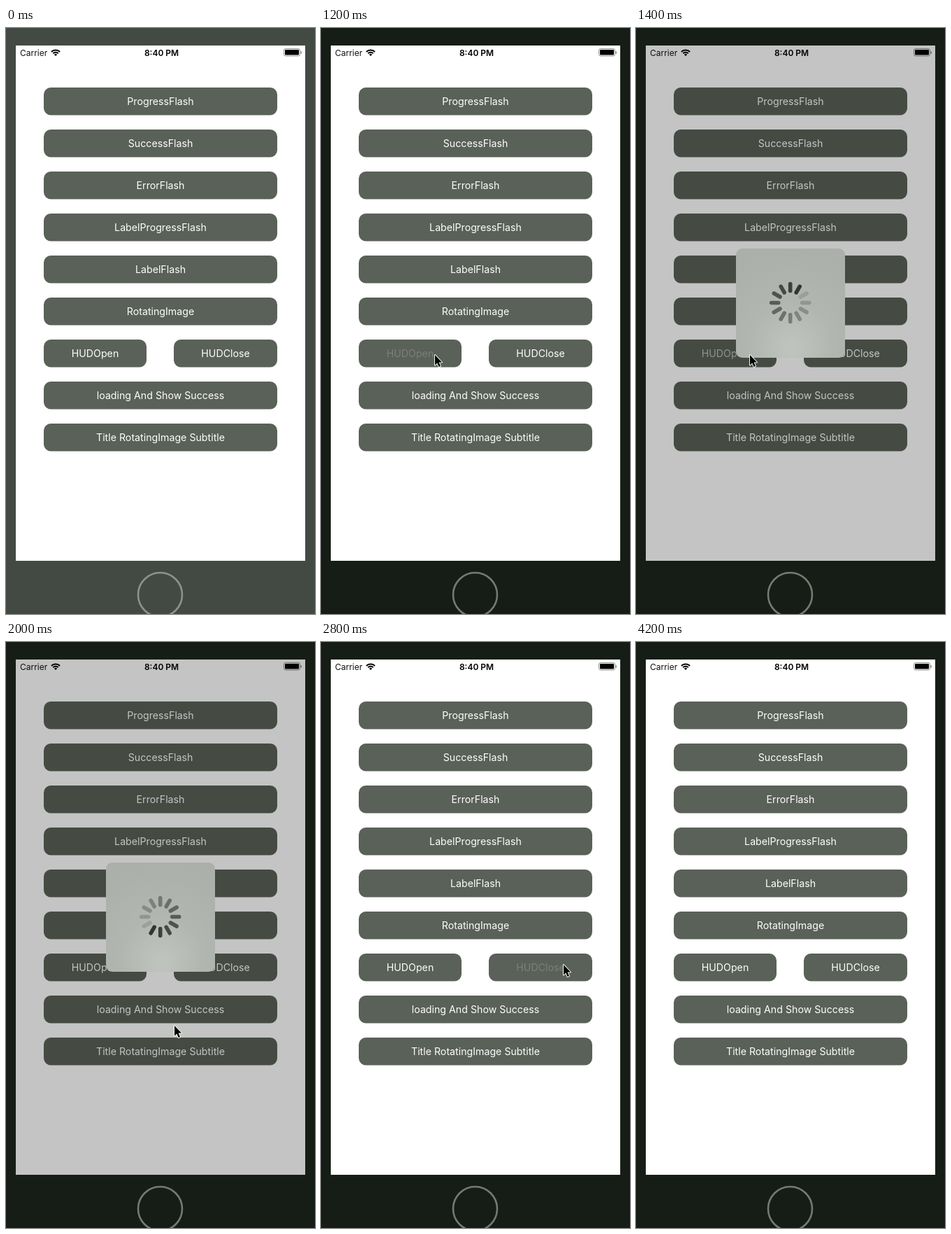
These frames come from a looping animation (442 by 837 pixels, 4300 ms). An HTML page with a canvas:

```html
<!DOCTYPE html>
<html lang="en">
<head>
<meta charset="utf-8">
<title>HUD demo</title>
<style>
  html, body { margin: 0; width: 100%; height: 100%; overflow: hidden; background: #161d16; }
  canvas { display: block; }
</style>
</head>
<body>
<canvas width="442" height="837"></canvas>
<script>
const ctx = document.querySelector('canvas').getContext('2d');
const LOOP = 4300, STEP = 100;
const FOCUS = 1200, HUD_OPEN = 1300, DIM = 1400, HUD_CLOSE = 2800;

const titles = ['ProgressFlash', 'SuccessFlash', 'ErrorFlash', 'LabelProgressFlash',
  'LabelFlash', 'RotatingImage', null, 'loading And Show Success', 'Title RotatingImage Subtitle'];

// Pointer path: time, x, y of the tip
const path = [
  [100, 243, 798], [300, 218, 680], [600, 174, 497], [700, 163, 471], [1000, 162, 466],
  [1600, 162, 466], [1700, 164, 470], [1900, 205, 530], [2000, 240, 547], [2100, 280, 535],
  [2300, 333, 478], [2400, 345, 462], [2500, 346, 460], [2900, 346, 460], [3100, 345, 475],
  [3500, 333, 608], [3800, 307, 725], [4000, 284, 790], [4100, 270, 808]
];

function box(x, y, w, h, r, fill) {
  ctx.beginPath();
  ctx.roundRect(x, y, w, h, r);
  ctx.fillStyle = fill;
  ctx.fill();
}

function text(str, x, y, font, color, align = 'center') {
  ctx.font = font + ' Inter, sans-serif';
  ctx.textAlign = align;
  ctx.fillStyle = color;
  ctx.fillText(str, x, y);
}

function button(title, x, y, w, opacity = 1) {
  box(x, y, w, 39.5, 10, '#5a6158');
  text(title, x + w / 2, y + 25, '14.2px', `rgba(253,255,253,${opacity})`);
}

// Label opacity: faint while pressed, fading back in after release
function labelOpacity(t, press, release) {
  if (t < press) return 1;
  return Math.min(1, 0.2 + Math.max(0, t - release) / 200 * 0.8);
}

function wifi(x, y) {
  ctx.strokeStyle = '#000';
  ctx.lineWidth = 2;
  for (const r of [5.3, 8.6]) {
    ctx.beginPath();
    ctx.arc(x, y, r, -Math.PI * 0.75, -Math.PI * 0.25);
    ctx.stroke();
  }
  ctx.beginPath();
  ctx.moveTo(x, y);
  ctx.arc(x, y, 3, -Math.PI * 0.75, -Math.PI * 0.25);
  ctx.fillStyle = '#000';
  ctx.fill();
}

function statusBar() {
  text('Carrier', 20, 39.5, '12px', '#111', 'left');
  text('8:40 PM', 222.5, 39.5, '600 12px', '#000');
  wifi(71, 40);
  ctx.beginPath();
  ctx.roundRect(397.5, 29.5, 23, 10.5, 2.5);
  ctx.strokeStyle = '#8f948f';
  ctx.lineWidth = 1;
  ctx.stroke();
  box(399, 31, 20, 7.5, 1, '#000');
  box(421.5, 33, 1.5, 4, 1, '#8f948f');
}

function screen(t) {
  box(14, 25, 414, 736, 0, '#fff');
  statusBar();
  titles.forEach((title, i) => {
    if (title) button(title, 54, 85 + i * 60, 334);
  });
  button('HUDOpen', 54, 445, 147, labelOpacity(t, 1200, 1300));
  button('HUDClose', 240, 445, 148, labelOpacity(t, 2600, 2800));
}

function hud(t) {
  const dimmed = t >= DIM;
  box(14, 25, 414, 736, 0, `rgba(0,6,0,${dimmed ? 0.235 : 0.015})`);
  const glow = ctx.createRadialGradient(223, 458, 8, 223, 440, 120);
  glow.addColorStop(0, dimmed ? '#bec3be' : '#c6cac6');
  glow.addColorStop(0.45, dimmed ? '#b2b6b1' : '#c1c5c1');
  glow.addColorStop(1, dimmed ? '#abb0aa' : '#bcc0bb');
  box(143, 315, 156, 156, 9, glow);

  const head = Math.round((t - HUD_OPEN) / STEP);
  ctx.lineWidth = 5.6;
  ctx.lineCap = 'round';
  for (let age = 0; age < 12; age++) {
    const a = (head - age) * Math.PI / 6;
    const dx = Math.sin(a), dy = -Math.cos(a);
    ctx.beginPath();
    ctx.moveTo(220.7 + dx * 17, 392.5 + dy * 17);
    ctx.lineTo(220.7 + dx * 27, 392.5 + dy * 27);
    ctx.strokeStyle = `rgba(50,54,50,${1 - age * 0.075})`;
    ctx.stroke();
  }
  ctx.lineCap = 'butt';
}

function pointer(t) {
  const i = path.findIndex(p => p[0] >= t);
  if (t < path[0][0] || i < 0) return;
  const a = path[Math.max(0, i - 1)], b = path[i];
  const k = b === a ? 0 : (t - a[0]) / (b[0] - a[0]);
  ctx.save();
  ctx.translate(a[1] + (b[1] - a[1]) * k, a[2] + (b[2] - a[2]) * k);
  const arrow = new Path2D('M1 1V15.5L4.3 12.4L6.7 18L9 17L6.6 11.6H11Z');
  ctx.lineJoin = 'round';
  ctx.lineWidth = 2;
  ctx.strokeStyle = '#f4f7f4';
  ctx.stroke(arrow);
  ctx.fillStyle = '#000';
  ctx.fill(arrow);
  ctx.restore();
}

function draw(t) {
  const focused = t >= FOCUS;
  box(0, 0, 442, 837, 0, focused ? '#161d16' : '#434a43');
  ctx.beginPath();
  ctx.arc(220.5, 809.5, 31.5, 0, Math.PI * 2);
  ctx.lineWidth = 2.6;
  ctx.strokeStyle = focused ? '#747b73' : '#8d938c';
  ctx.stroke();
  screen(t);
  if (t >= HUD_OPEN && t < HUD_CLOSE) hud(t);
  pointer(t);
}

const start = performance.now();
function frame() {
  const t = (performance.now() - start) % LOOP;
  draw(Math.floor(t / STEP) * STEP);
  requestAnimationFrame(frame);
}
frame();
</script>
</body>
</html>
```
